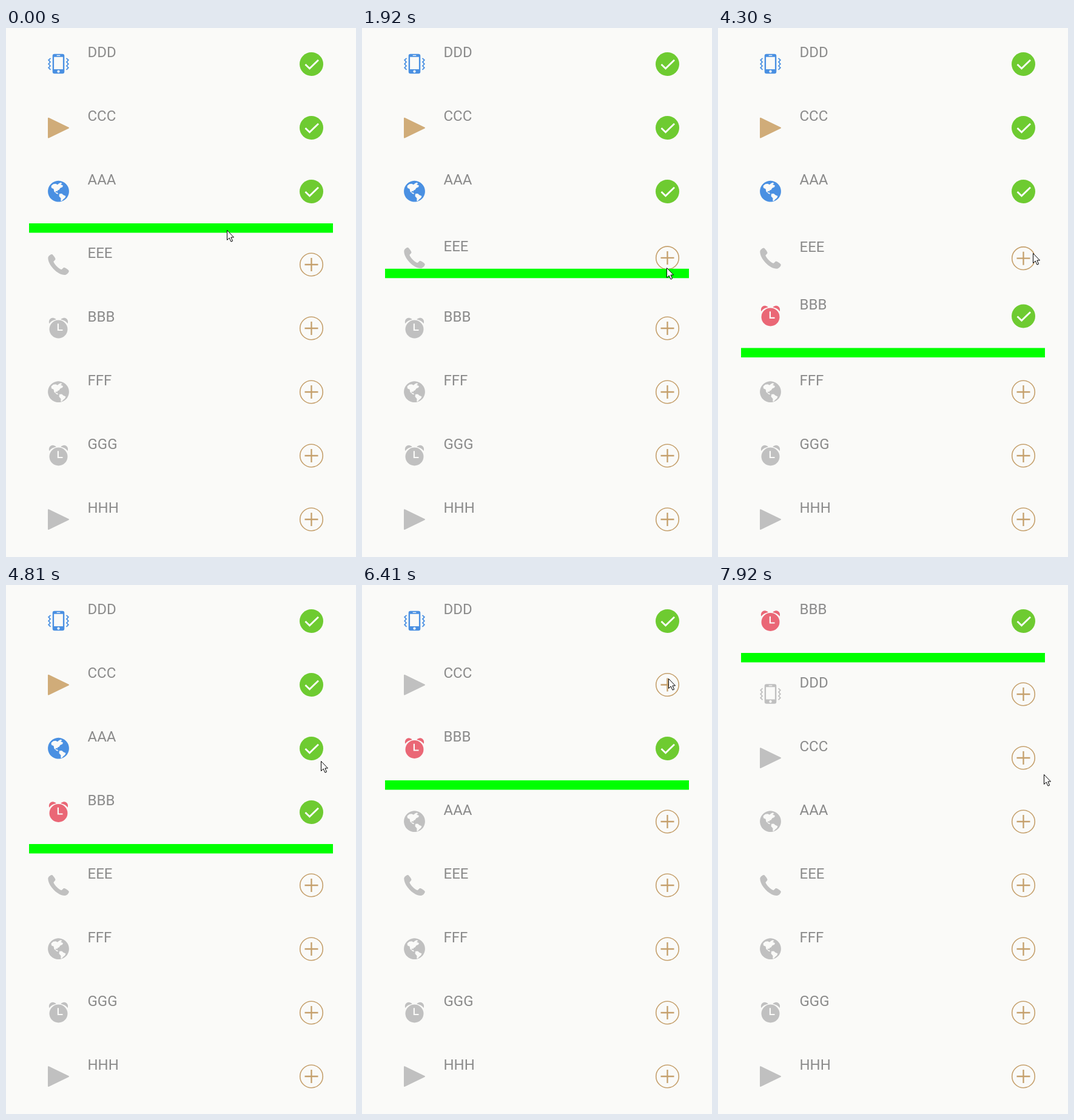
Recreate the animation shown at these times as an HTML page. Size 577x872 px, loop 8 s.

```html
<!DOCTYPE html>
<html lang="en">
<head>
<meta charset="utf-8">
<title>Sortable list</title>
<style>
  html, body { margin: 0; width: 100%; height: 100%; overflow: hidden; background: #fafaf8; }
  svg { display: block; }
  text { font: 24px Roboto, Arial, sans-serif; fill: #8b8b8b; }
</style>
</head>
<body>
<svg width="577" height="872" viewBox="0 0 577 872">
  <defs>
    <g id="vibrate">
      <path fill="currentColor" fill-rule="evenodd" d="M-6.5 -16.5H6.5Q9.8 -16.5 9.8 -13.2V12.7Q9.8 16 6.5 16H-6.5Q-9.8 16 -9.8 12.7V-13.2Q-9.8 -16.5 -6.5 -16.5Z
        M-7.4 -11.6V8.8H7.4V-11.6ZM-2.8 -14.5V-13.3H2.8V-14.5ZM0 10.2A2.1 2.1 0 1 0 .01 10.2Z"/>
      <g fill="none" stroke="currentColor" stroke-width="1.8">
        <path d="M-13 -9.5L-16.3 -6.5 -13.5 -3.2 -16.3 0 -13.5 3.2 -16.3 6.2 -13 9.5"/>
        <path d="M13 -9.5L16.3 -6.5 13.5 -3.2 16.3 0 13.5 3.2 16.3 6.2 13 9.5"/>
      </g>
    </g>
    <path id="play" fill="currentColor" stroke="currentColor" stroke-width="2" stroke-linejoin="round"
      d="M-16.5 -15.6L16.5 .3 -16.5 16.2Z"/>
    <path id="globe" fill="currentColor" fill-rule="evenodd" d="M0 -17.5A17.4 17.4 0 1 1 -.01 -17.5Z
      M-12 -9L-8.5 -12 -4.5 -12.6 -1.5 -11 1 -13.2 4 -14.5 6 -13 3.5 -11.5 7.5 -9.5 6.5 -7 3 -5.6 1 -2.6 -1.5 -1.5 -2 .3 -4.3 -.6 -5 1.6 -2 2 0 4.4 -3 4 -7 .4 -8 -4 -11.5 -5.6Z
      M1.5 4L5.5 3.8 8 6 12 7.6 10.8 10.8 8 13 5.4 16 3.8 15.6 4 11.5 1 8Z"/>
    <path id="call" fill="currentColor" d="M-17.2 -11C-17 -14 -12.4 -17.6 -10.5 -16.8 -9 -16 -5 -10.6 -5 -9 -5 -7 -8.5 -5.5 -8 -4 -6.5 0 0 6.5 4.5 8.3 6 8.8 7.5 5 9.3 5 11 5 16.8 9 17.2 10.5 17.8 12.5 14 17 11 17.2 -1 18 -17.5 1 -17.2 -11Z"/>
    <g id="alarm">
      <g fill="currentColor">
        <circle cy="1.7" r="15"/>
        <path id="bell" d="M-15.2 -7.6C-17 -13 -13 -17.8 -8 -16.8 -6 -16.4 -4.4 -15.4 -3.8 -14.4 -8.6 -13.6 -12.6 -11.2 -15.2 -7.6Z"/>
        <use href="#bell" transform="scale(-1 1)"/>
      </g>
      <path d="M-.6 -7.5V3.2H7" fill="none" stroke="#fafaf8" stroke-width="2.2"/>
    </g>
    <g id="check">
      <circle r="19.5" fill="#6ecb31"/>
      <path d="M-10 .5L-3 7.3 11.5 -6.8" fill="none" stroke="#fff" stroke-width="2.8"/>
    </g>
    <g id="plus" fill="none" stroke="#c5a06c">
      <circle r="18.8" stroke-width="1.6"/>
      <path d="M-11 0H11M0 -11V11" stroke-width="2.3"/>
    </g>
  </defs>
  <g id="rows"></g>
  <rect id="bar" x="38" y="7" width="501" height="15.5" fill="#0f0"/>
  <path id="cursor" d="M.5 .5V16.5L4.2 13 7 19.2 9.6 18 6.9 12H11.5Z" fill="#fff" stroke="#000"/>
</svg>
<script>
const LOOP = 8000, SLIDE = 450, ROW = 105, GAP = 15.5;
const GREY = '#c0c0c0', BLUE = '#4a90e2';

// Listed from the back to the front
const items = {
  B: ['alarm', '#ea6776'], D: ['vibrate', BLUE], C: ['play', '#d0ac79'],
  A: ['globe', BLUE], E: ['call', '#6cbf8c'], F: ['globe', BLUE],
  G: ['alarm', '#ea6776'], H: ['play', '#d0ac79']
};

// The list order ('|' is the bar) and the pointer at the start
const firstOrder = 'DCA|EBFGH', firstPoint = [364, 333];

// Bursts of change: the wait before the slide, the new order, the pointer's way
const bursts = [
  { from: 460, to: 1180, steps: 6, wait: 0, order: firstOrder, way: [[504, 440], [502, 395]] },
  { from: 1650, to: 2640, steps: 8, wait: -5, order: 'DCAE|BFGH', way: [[502, 395], [507, 487]] },
  { from: 3070, to: 4030, steps: 8, wait: -60, order: 'DCAEB|FGH', way: [[536, 430], [519, 371]] },
  { from: 4150, to: 4960, steps: 7, wait: 75, order: 'DCAB|EFGH', way: [[519, 371], [528, 317], [510, 262]] },
  { from: 5230, to: 5980, steps: 7, wait: 50, order: 'DCB|AEFGH', way: [[510, 262], [505, 154]] },
  { from: 6410, to: 7040, steps: 6, wait: 50, order: 'DB|CAEFGH', way: [[498, 61]] },
  { from: 7470, to: 7920, steps: 4, wait: 0, order: 'B|DCAEFGH', way: [[537, 312]] }
];

const byId = id => document.getElementById(id);
const mix = (a, b, p) => a + (b - a) * p;
const ease = p => (1 - Math.cos(Math.PI * p)) / 2;
const clamp = p => Math.min(1, Math.max(0, p));
const place = (el, x, y) => el.setAttribute('transform', `translate(${x} ${y})`);

function add(parent, tag, attrs) {
  const el = document.createElementNS('http://www.w3.org/2000/svg', tag);
  for (const key in attrs) el.setAttribute(key, attrs[key]);
  return parent.appendChild(el);
}

const rows = Object.entries(items).map(([key, [icon, color]]) => {
  const row = add(byId('rows'), 'g', {});
  const pic = add(row, 'use', { href: '#' + icon, x: 86.5, y: 59.3 });
  add(row, 'text', { x: 134.5, y: 48.3 }).textContent = key.repeat(3);
  const mark = add(row, 'use', { x: 503.5, y: 59.5 });
  return { key, color, row, pic, mark };
});

const isOn = (order, key) => order.indexOf(key) < order.indexOf('|');

function rowY(order, key) {
  const i = order.indexOf(key);
  return isOn(order, key) ? i * ROW : (i - 1) * ROW + GAP;
}

// A point at share p of the way, with legs of equal time
function along(points, p) {
  const legs = points.length - 1;
  const i = Math.min(legs - 1, Math.floor(p * legs));
  return [0, 1].map(k => Math.round(mix(points[i][k], points[i + 1][k], p * legs - i)));
}

function draw(time) {
  const n = bursts.findLastIndex(b => b.from <= time);
  const now = bursts[Math.max(n, 0)], last = bursts[n - 1];
  const before = last ? last.order : firstOrder;
  const home = last ? last.way.at(-1) : firstPoint;

  // The picture advances in even steps and holds between them
  const gap = (now.to - now.from) / (now.steps - 1);
  const step = Math.floor((time - now.from + 15) / gap);
  const share = clamp(step / (now.steps - 1));
  const done = clamp((share * (now.to - now.from) - now.wait) / SLIDE);
  const p = ease(done);

  for (const { key, color, row, pic, mark } of rows) {
    // Ticks clear at once, but appear only when the slide is over
    const on = isOn(now.order, key) && (done === 1 || isOn(before, key));
    place(row, 0, mix(rowY(before, key), rowY(now.order, key), p));
    pic.style.color = on ? color : GREY;
    mark.setAttribute('href', on ? '#check' : '#plus');
  }
  place(byId('bar'), 0, ROW * mix(before.indexOf('|'), now.order.indexOf('|'), p));
  place(byId('cursor'), ...along([home, ...now.way], share));
}

const begin = performance.now();
function loop() {
  draw((performance.now() - begin) % LOOP);
  requestAnimationFrame(loop);
}
loop();
</script>
</body>
</html>
```
